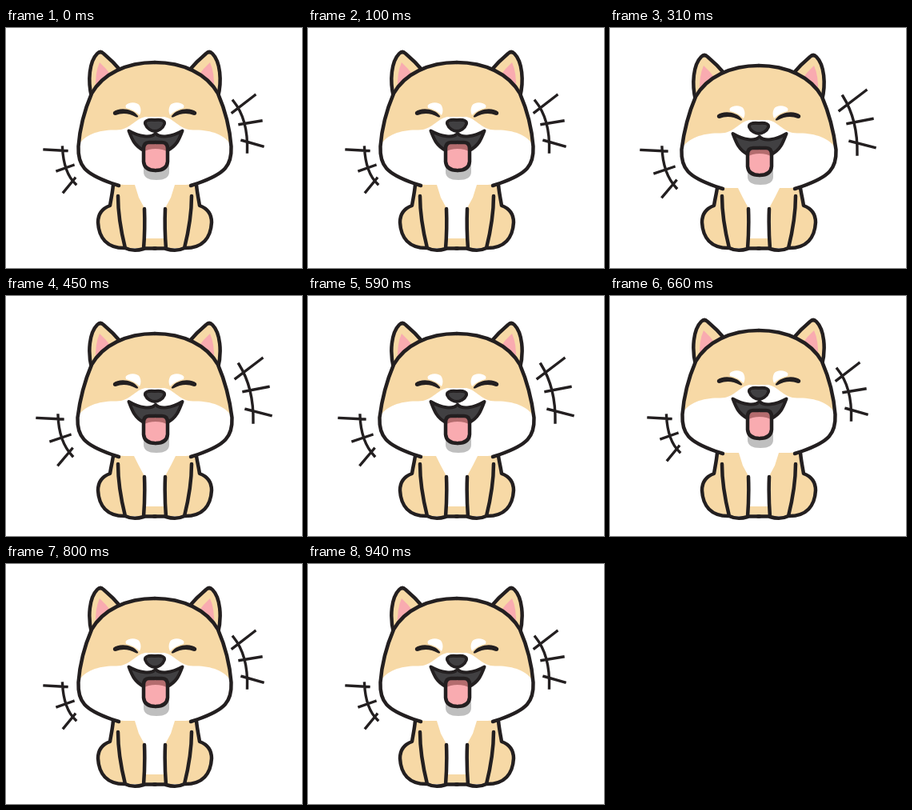
Animation, 370 px wide and 300 px high, one loop 970 ms. Source, as an HTML page:

```html
<!DOCTYPE html>
<html lang="en">
<head>
<meta charset="utf-8">
<title>Laughing puppy</title>
<style>
html, body { margin: 0; width: 100%; height: 100%; overflow: hidden; background: #fff; }
svg { display: block; width: 100vw; height: 100vh; }
</style>
</head>
<body>
<svg id="stage" viewBox="0 0 370 300" fill="none" stroke-linecap="round" stroke-linejoin="round"></svg>
<script>
const INK = '#231f20', TAN = '#f7d9a6', PINK = '#f9abb0', SHADE = '#b46c6e', DARK = '#414042';
const LOOP = 970, STEP = 70, LEAD = 40;
const stage = document.getElementById('stage');

const fill = (d, color) => `<path d="${d}" fill="${color}"/>`;
const line = (d, width = 4.5, color = 'none', cap = 'round') =>
  `<path d="${d}" fill="${color}" stroke="${INK}" stroke-width="${width}" stroke-linecap="${cap}"/>`;
// The puppy is symmetric about x = 186
const both = s => s + `<g transform="matrix(-1 0 0 1 372 0)">${s}</g>`;

// k = 0: head up, mouth wide; k = 1: head down, laugh lines out
function pose(k) {
  const m = (a, b) => a + (b - a) * k;
  const top = m(43, 47), y = m(0, 4), chin = m(196, 200), side = m(90.5, 89.5);

  const flank = `M134 ${chin}C133 207 131 215 130 222C119 226 115 233 115 243C116 262 126 275 148 275`;
  const body =
    both(fill(flank + `H186V${chin - 4}H134Z`, TAN)) +
    both(fill(`M187 ${chin - 6}H160L${m(161, 160)} ${chin}L166 212L173 225V263H187Z`, '#fff')) +
    both(line(flank) +
      line('M140 210C140 235 144 255 149 275Q159 280 172 276Q174 250 173 226') +
      line('M172 275.5H187'));

  const ears = both(
    line(`M107 ${86 + y}C102 ${66 + y} 104 ${42 + y} 114 ${32 + y}Q118 ${28 + y} 122 ${32 + y}Q134 ${42 + y} 144 ${54 + y}`, 4.5, TAN) +
    fill(`M117 ${43 + y}Q125 ${50 + y} 132 ${60 + y}L112 ${78 + y}Q111 ${56 + y} 117 ${43 + y}Z`, PINK));

  const half = `M186 ${top}C151 ${top} 121 ${57 + y} 107 ${82 + y}C98 ${103 + y} 92 ${128 + y} ${side} ${148 + y}` +
    `C${side - 1} ${172 + y} 98 ${182 + y} 132 ${chin - 2}`;
  const head =
    both(fill(half + `Q140 ${chin} 148 ${chin}H186Z`, TAN)) +
    both(fill(`M${side} ${147 + y}C98 ${133 + y} 117 ${127 + y} 137 ${127.5 + y}C155 ${128 + y} 160 ${114 + y} 174 ${111 + y}` +
      `H187V${chin}H148Q140 ${chin} 132 ${chin - 2}C98 ${182 + y} ${side - 1} ${172 + y} ${side} ${147 + y}Z`, '#fff')) +
    both(line(half + `L141 ${chin + 1}`));

  const eyes = both(
    fill(`M149.5 ${97 + y}C153 ${92 + y} 164 ${92 + y} 167 ${97 + y}Q170 ${103 + y} 167 ${109 + y}Q160 ${102 + y} 150 ${100 + y}Z`, '#fff') +
    fill(`M134 ${105 + y}C141 ${99 + y} 158 ${100 + y} 165 ${110 + y}Q166 ${112 + y} 163 ${111.5 + y}C153 ${106 + y} 145 ${106 + y} 137 ${109 + y}Q133 ${109 + y} 134 ${105 + y}Z`, INK));

  const lip = m(132, 136), corner = m(128.5, 132), cheek = m(153, 158), base = m(178, 184), tip = m(143, 150);
  const jaw = `M186 ${lip}C180 ${lip + 6} 166 ${lip + 4} 152.5 ${corner}C157 ${corner + 12} 160 ${cheek - 6} 171 ${cheek}`;
  const tongue = `M186 ${tip}H178Q171 ${tip} 171 ${tip + 8}V${base - 11}Q172 ${base} 186 ${base}`;
  const mouth =
    fill(`M171 ${base - 10}H203V${base + 2}Q203 ${base + 12} 187 ${base + 12}Q171 ${base + 12} 171 ${base + 2}Z`, '#bfbfbf') +
    both(fill(jaw + 'H187V' + lip + 'Z', DARK) + line(jaw, 4)) +
    both(fill(tongue + 'H187V' + tip + 'Z', PINK) +
      fill(`M187 ${tip}H178Q171 ${tip} 171 ${tip + 8}V${m(155, 161)}Q176 ${m(151, 157)} 187 ${m(151, 157)}Z`, SHADE) +
      line(tongue));

  const nose =
    line(`M186 ${m(115, 119)}C195 ${m(114, 118)} 199 ${m(116, 120)} 198 ${m(120, 124)}C196 ${m(126, 129)} 190 ${m(129, 132)} 186 ${m(129, 132)}` +
      `C182 ${m(129, 132)} 176 ${m(126, 129)} 174 ${m(120, 124)}C173 ${m(116, 120)} 177 ${m(114, 118)} 186 ${m(115, 119)}Z`, 3.8, DARK);

  const rays = k
    ? 'M65 149Q66 182 83 200M39 152.5L71 154M56 181.5L80 173.5M65.5 211L82.5 191' +
      'M291 85Q310 115 309 158M287 103L320 78M297 119.5L328 113.5M300 141.5L331 149.5'
    : 'M70.5 149Q72 181 87 195M48 152L76 153.5M64 178.5L84 171.5M72 205L86 188' +
      'M284 91Q303 114 301.5 155M283 105.5L311 84M292 120.5L319 116M295 140.5L321 148';

  return body + ears + head + eyes + `<g transform="translate(1 0)">${mouth}</g>` + nose + line(rays, 3.4, 'none', 'square');
}

stage.innerHTML = `<g>${pose(0)}</g><g>${pose(1)}</g>`;
const poses = [...stage.children];

function draw(time) {
  const active = Math.floor((time % LOOP + LEAD) / STEP) % 2;
  poses.forEach((g, i) => g.setAttribute('visibility', i === active ? 'visible' : 'hidden'));
}

const start = performance.now();
function tick(now) {
  draw(Math.max(0, now - start));
  requestAnimationFrame(tick);
}
draw(0);
requestAnimationFrame(tick);
</script>
</body>
</html>
```
